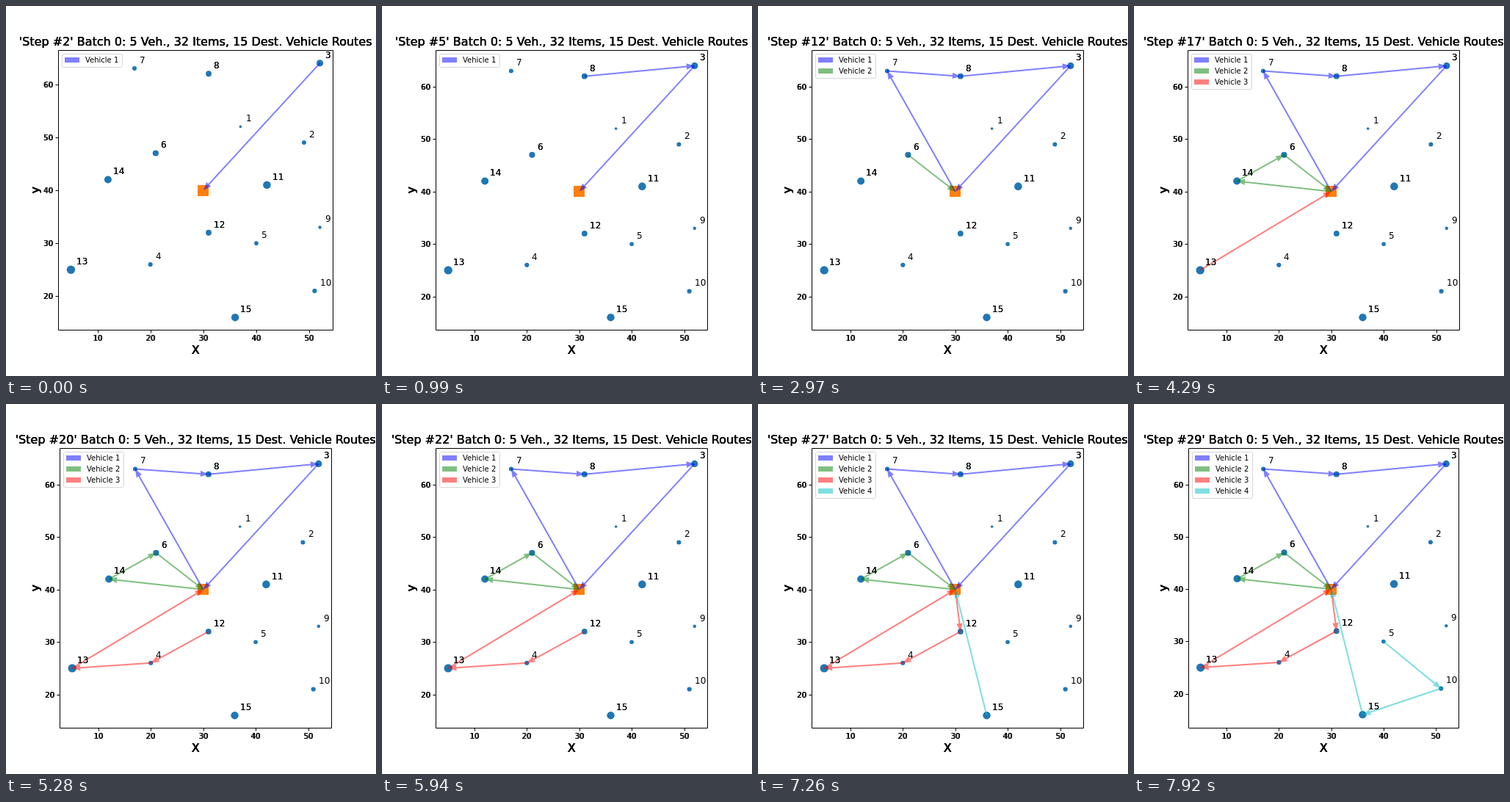
Recreate the animation shown at these times as an HTML page. Size 504 px wide and 504 px high, loop 8000 ms.

```html
<!DOCTYPE html>
<html lang="en">
<head>
<meta charset="utf-8">
<title>Vehicle routes</title>
<style>
  html, body { margin: 0; width: 100%; height: 100%; overflow: hidden; background: #fff; }
  svg { display: block; width: 504px; height: 504px; font-family: "DejaVu Sans", sans-serif; }
</style>
</head>
<body>
<svg id="stage" viewBox="0 0 504 504"></svg>
<script>
const stage = document.getElementById('stage');
const LOOP = 8000, TICK = 330;
const MID = 258, TOP = 60.5, BOTTOM = 441.5;
const HEAD = 1.5, REACH = 0.65; // arrow head in data units

// x, y, radius; the depot comes first
const places = [
  [30, 40, 7.5], [37, 52, 1.8], [49, 49, 3], [52, 64, 4.6],
  [20, 26, 3.1], [40, 30, 2.8], [21, 47, 4.1], [17, 63, 3],
  [31, 62, 3.9], [52, 33, 2.2], [51, 21, 3.1], [42, 41, 5.3],
  [31, 32, 3.9], [5, 25, 5.7], [12, 42, 5], [36, 16, 5.2]
];

// One trip per vehicle: the stop of each item, last delivery first, one item per tick
const trips = ['3 3 8 8 8 7 7', '6 6 6 14 14 14', '13 4 4 12 12 12 12', '15 15 15 10 5']
  .map(s => s.split(' ').map(Number));
const colors = ['#0000ff', '#008000', '#ff0000', '#00bfbf'];

const snap = v => Math.round(v) + 0.5;

// Legs known at tick k; a trip is closed once the next vehicle starts
function plan(k) {
  const legs = [];
  let left = k + 1, count = 0;
  for (const trip of trips) {
    if (left <= 0) break;
    let to = 0;
    for (const stop of trip.slice(0, left)) {
      if (stop !== to) legs.push([stop, to, colors[count]]);
      to = stop;
    }
    left -= trip.length;
    if (left > 0) legs.push([0, to, colors[count]]);
    count++;
  }
  return { legs, count };
}

// Equal scales, with a 5% margin around the stops and the arrow heads
function fit(legs) {
  const ys = places.map(p => p[1]);
  for (const [a, b] of legs) {
    const [x1, y1] = places[a], [x2, y2] = places[b];
    const len = Math.hypot(x2 - x1, y2 - y1);
    const neck = y2 - HEAD * (y2 - y1) / len, side = REACH * (x2 - x1) / len;
    ys.push(neck - side, neck + side);
  }
  const lo = Math.min(...ys), span = Math.max(...ys) - lo;
  const scale = (BOTTOM - TOP) / (span * 1.1);
  const px = x => MID + (x - 28.5) * scale;
  const py = y => BOTTOM - (y - lo + span * 0.05) * scale;
  return { px, py, left: snap(px(2.65)), right: snap(px(54.35)) };
}

function text(str, x, y, size, anchor = 'start', shifts = [0], extra = '') {
  return shifts.map(d =>
    `<text x="${x + d}" y="${y}" font-size="${size}" text-anchor="${anchor}" ${extra}>${str}</text>`
  ).join('');
}

function arrow([x1, y1], [x2, y2], color) {
  const len = Math.hypot(x2 - x1, y2 - y1);
  const angle = Math.atan2(y2 - y1, x2 - x1) * 180 / Math.PI;
  return `<path transform="translate(${x1} ${y1}) rotate(${angle})" fill="${color}" opacity=".5"
    d="M0 -1H${len - 11}V-4.2L${len} 0L${len - 11} 4.2V1H0Z"/>`;
}

function legend(x, count) {
  let out = `<rect x="${x}" y="65.5" width="82" height="${3 + 15 * count}" rx="2"
    fill="#fff" fill-opacity=".8" stroke="#ccc" stroke-opacity=".8"/>`;
  for (let i = 0; i < count; i++) {
    const y = 70 + 15 * i;
    out += `<rect x="${x + 3.5}" y="${y}" width="20" height="7" fill="${colors[i]}" opacity=".5"/>`;
    out += text(`Vehicle ${i + 1}`, x + 31.5, y + 7, 10);
  }
  return out;
}

function draw(k) {
  const { legs, count } = plan(k);
  const { px, py, left, right } = fit(legs);
  const at = n => [px(places[n][0]), py(places[n][1])];
  const bold = [0, 0, 0.4], smear = [-1, 0];
  let out = '', labels = '', ticks = '';

  places.forEach(([x, y, r], n) => {
    if (!n) {
      out += `<rect x="${Math.round(px(x) - r)}" y="${Math.round(py(y) - r)}"
        width="${2 * r}" height="${2 * r}" fill="#ff7f0e"/>`;
      return;
    }
    out += `<circle cx="${px(x)}" cy="${py(y)}" r="${r}" fill="#1f77b4"/>`;
    labels += text(n, Math.round(px(x + 1)), Math.round(py(y + 1)), 12, 'start', r > 3.5 ? [0, 0] : [0]);
  });
  legs.forEach(([a, b, color]) => { out += arrow(at(a), at(b), color); });

  for (let v = 10; v <= 50; v += 10) {
    const x = snap(px(v)), y = snap(py(v + 10));
    ticks += `M${x} ${BOTTOM}v4M${left} ${y}h-4`;
    out += text(v, x, 456, 10, 'middle', smear);
    out += text(v + 10, left - 7, y + 3.5, 10, 'end', smear);
  }
  out += `<path d="M${left} ${TOP}H${right}V${BOTTOM}H${left}Z${ticks}" fill="none" stroke="#000"/>`;

  out += labels;
  out += text('X', MID, 474, 16, 'middle', [0, 0, 0.7]);
  out += text('y', 0, 0, 16, 'middle', [0, 0, 0.7], 'transform="translate(45 251) rotate(-90)"');
  out += text(`'Step #${k + 1 + count}' Batch 0: 5 Veh., 32 Items, 15 Dest. Vehicle Routes`,
    MID, 54, 16, 'middle', bold);
  out += legend(left + 5, count);
  stage.innerHTML = out;
}

let last = -1;
function render() {
  const k = Math.floor(performance.now() % LOOP / TICK);
  if (k !== last) draw(last = k);
  requestAnimationFrame(render);
}
render();
</script>
</body>
</html>
```
